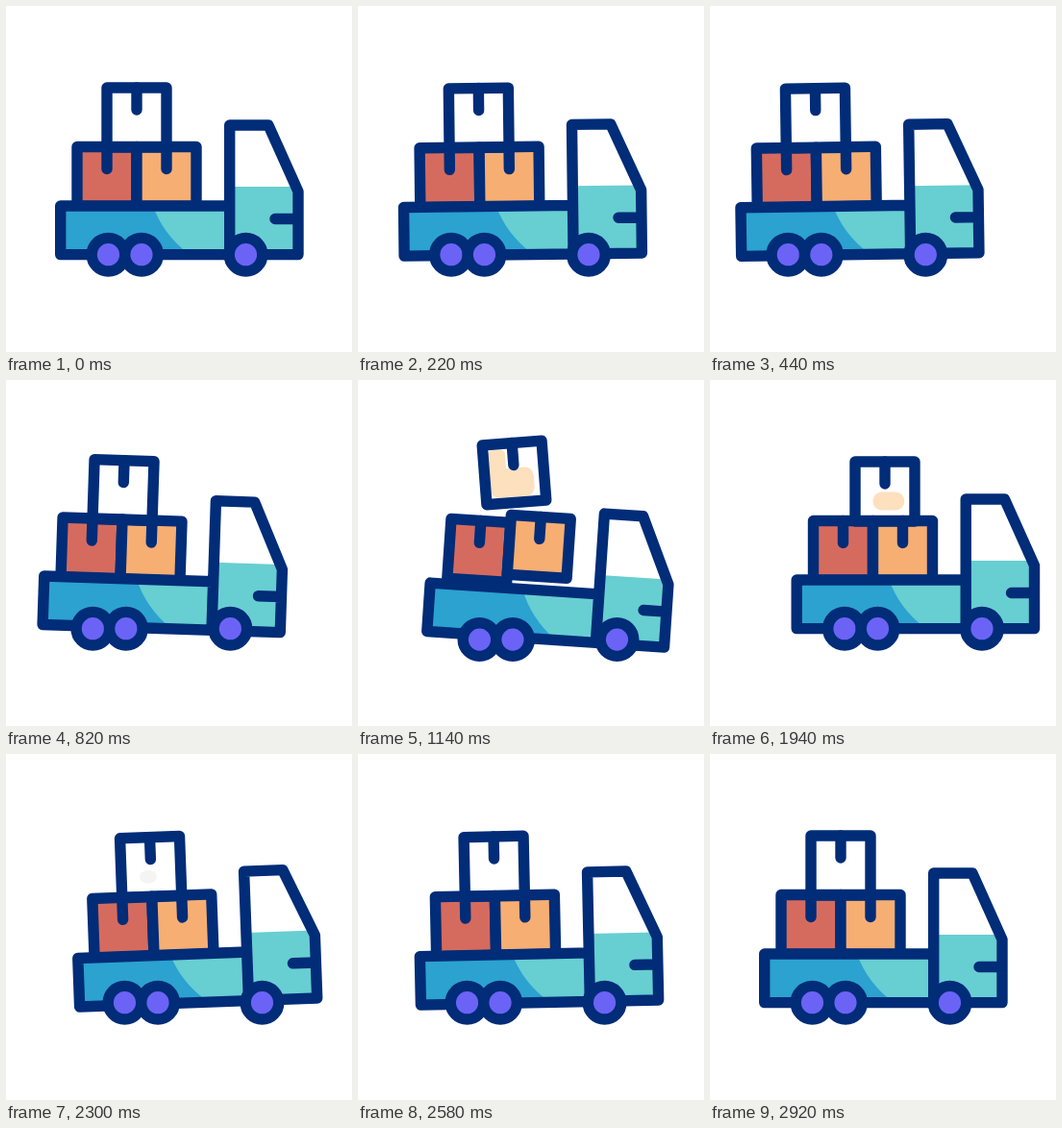
These frames come from a looping animation (360x360 px, 3600 ms). An HTML page:

```html
<!DOCTYPE html>
<html lang="en">
<head>
<meta charset="utf-8">
<title>Delivery truck</title>
<style>
  html, body { margin: 0; width: 100%; height: 100%; overflow: hidden; background: #fff; }
  svg { display: block; width: 100vw; height: 100vh; }
  .line { stroke: #002c78; stroke-width: 11.4; stroke-linecap: round; stroke-linejoin: round; fill: none; }
</style>
</head>
<body>
<svg viewBox="0 0 360 360">
  <defs>
    <g id="frame" class="line">
      <rect x="-31" y="-31" width="62" height="62"/>
      <path d="M0 -31V-8"/>
    </g>
    <circle id="wheel" class="line" r="17.3" cy="258.7" style="fill:#6b63f5"/>
  </defs>
  <g id="truck">
    <g id="body">
      <g id="left"><rect x="-31" y="-31" width="62" height="62" fill="#d56b5e"/><use href="#frame"/></g>
      <g id="right"><rect x="-31" y="-31" width="62" height="62" fill="#f6ae73"/><use href="#frame"/></g>
      <g id="top">
        <g id="patch">
          <rect id="column" x="-26" y="-25" width="18" rx="5"/>
          <rect id="lump" rx="9"/>
        </g>
        <use href="#frame"/>
      </g>
      <path d="M57 208H233V258H57Z" fill="#2ba2cf"/>
      <path d="M153 208Q163 237 190 258H233V208Z" fill="#67ced2"/>
      <path d="M233 124H273L304 193V258H233Z" fill="#fff"/>
      <path d="M233 188H302L304 193V258H233Z" fill="#67ced2"/>
      <path class="line" d="M56.7 208H232.7V258.6H56.7ZM232.7 124H273L304 193V258.6H232.7ZM280 221.5H304"/>
    </g>
    <use href="#wheel" x="106.5"/>
    <use href="#wheel" x="141"/>
    <use href="#wheel" x="249.5"/>
  </g>
</svg>
<script>
const LOOP = 3600, STEP = 20;
const el = id => document.getElementById(id);

const progress = (t, from, to) => Math.min(1, Math.max(0, (t - from) / (to - from)));
const ease = (t, from, to) => {
  const u = progress(t, from, to);
  return u * u * (3 - 2 * u);
};
// Rises from 0 to 1 and falls back within the given span.
const bump = (t, from, to, power) => Math.max(0, Math.sin(Math.PI * progress(t, from, to))) ** power;

// Smooth monotone curve through a few [time, value] points.
function curve(...keys) {
  const last = keys.length - 1;
  const slope = i => (keys[i + 1][1] - keys[i][1]) / (keys[i + 1][0] - keys[i][0]);
  const tangent = i => {
    if (i === 0 || i === last) return 0;
    const a = slope(i - 1), b = slope(i);
    return a * b <= 0 ? 0 : 2 * a * b / (a + b);
  };
  return t => {
    if (t >= keys[last][0]) return keys[last][1];
    const i = keys.findIndex(k => k[0] > t) - 1;
    const [t0, v0] = keys[i], [t1, v1] = keys[i + 1];
    const h = t1 - t0, u = (t - t0) / h, w = 1 - u;
    return v0 * (1 + 2 * u) * w * w + v1 * u * u * (3 - 2 * u)
      + h * u * w * (tangent(i) * w - tangent(i + 1) * u);
  };
}

const drive = curve([0, 0], [580, -29.5], [1080, 12], [1140, 20], [1500, 36.3],
  [1690, 40], [2300, 17], [2920, 0]);
const tilt = curve([0, 0], [350, -1], [1190, 3.9], [1940, 0], [2300, -2.1], [2920, 0]);

function set(id, attributes) {
  for (const [name, value] of Object.entries(attributes)) el(id).setAttribute(name, value);
}

function place(id, x, y, angle = 0) {
  set(id, { transform: `translate(${x} ${y}) rotate(${angle})` });
}

function drawPatch(t) {
  const u = progress(t, 1140, 2300);
  const width = 46 - 28 * u * u, height = 30 - 16 * u;
  const x = 7 * bump(t, 1500, 2300, 1) - 3;
  const fade = progress(t, 1940, 2300);
  const color = [253, 224, 190].map(c => Math.round(c + (244 - c) * fade));
  set('patch', { fill: `rgb(${color})`, visibility: t >= 960 && t < 2420 ? 'visible' : 'hidden' });
  set('lump', { x: x - width / 2, y: 10 - height / 2, width, height });
  set('column', { height: 44 * (1 - ease(t, 1500, 1900)) });
}

function draw(t) {
  const hop = -47.5 * bump(t, 960, 1680, 1.5);
  const slide = 12.5 * (ease(t, 1100, 1740) - ease(t, 1960, 2260));
  place('truck', drive(t), 12 * bump(t, 900, 1460, 2));
  set('body', { transform: `rotate(${tilt(t)} 180 181)` });
  place('left', 105, 177.5 + hop * 0.23);
  place('right', 167, 177.5 + hop * 0.52);
  place('top', 136 + slide, 116 + hop, -9.8 * bump(t, 960, 1680, 0.5));
  drawPatch(t);
}

const start = performance.now();
function tick() {
  const t = (performance.now() - start) % LOOP;
  draw(Math.floor(t / STEP) * STEP);
  requestAnimationFrame(tick);
}
tick();
</script>
</body>
</html>
```
